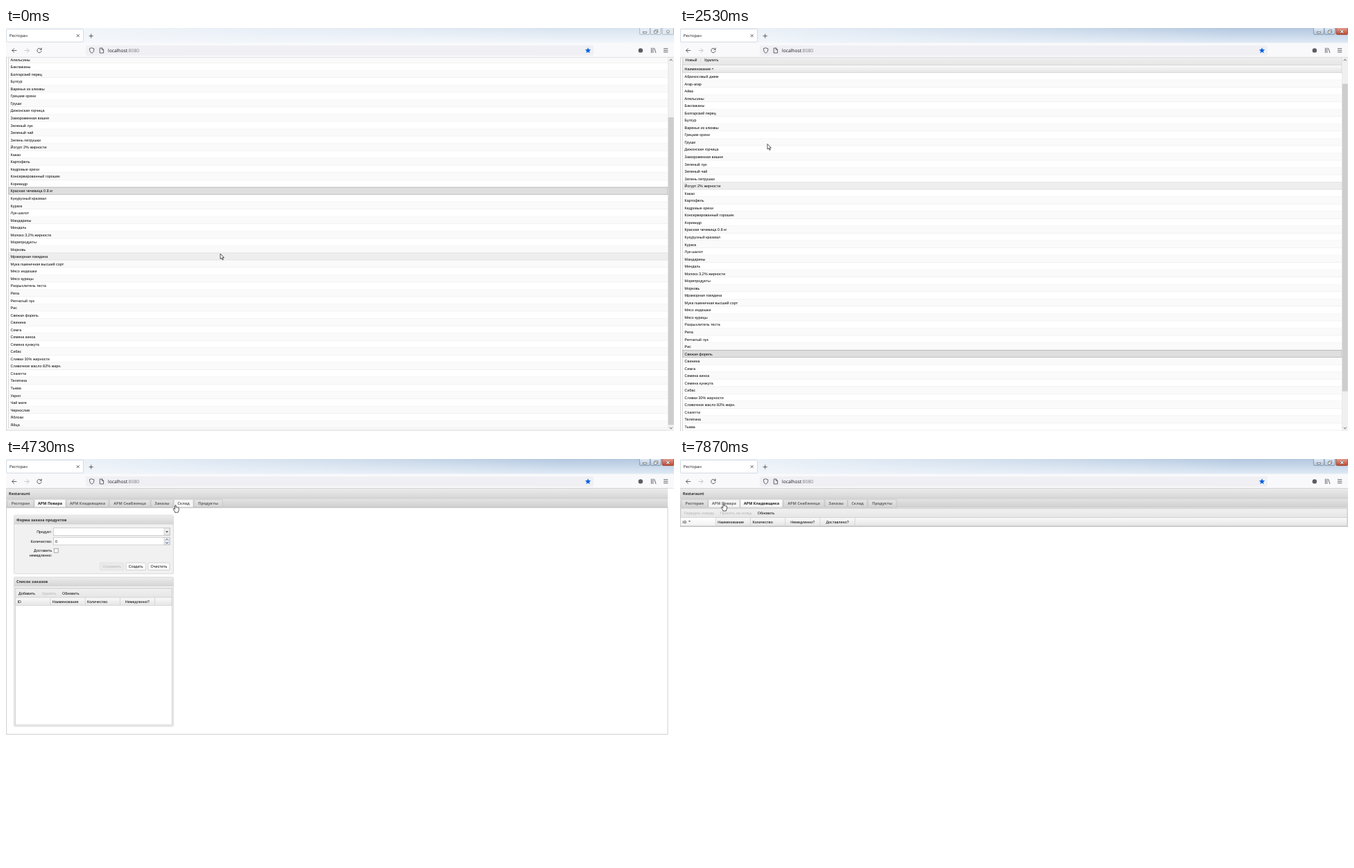
Recreate the animation shown at these times as an HTML page. Size 963 by 582 pixels, loop 8000 ms.

```html
<!DOCTYPE html>
<html lang="ru">
<head>
<meta charset="utf-8">
<title>Ресторан</title>
<style>
  html, body { margin: 0; width: 100%; height: 100%; overflow: hidden; background: #fff; }
  svg { display: block; width: 963px; height: 582px; }
  text { font: 5.45px "Liberation Sans", Arial, sans-serif; fill: #000; text-rendering: geometricPrecision; white-space: pre; }
  .bold { font: bold 5.5px "Noto Sans", "Open Sans", sans-serif; fill: #333; }
  .ui { font: 5.75px "Open Sans", "Noto Sans", sans-serif; fill: #15141a; }
  .url { font-size: 6.7px; }
  .off { fill: #b4b4b4; }
  .icon { fill: none; stroke: #4a4a52; stroke-width: .85; stroke-linecap: round; stroke-linejoin: round; }
  .tab rect { fill: url(#tabOff); stroke: #bdbdbd; stroke-width: .6; }
  .tab text { fill: #666; }
  .tab.hover rect { fill: #f6f6f6; }
  .tab.active rect { fill: url(#tabOn); }
  .tab.active text { fill: #222; }
</style>
</head>
<body>
<svg id="stage" viewBox="0 0 963 582" xmlns="http://www.w3.org/2000/svg"></svg>
<script>
const stage = document.getElementById('stage');
const LOOP = 8000, FPS = 15;
const ROW = 10.54, ROW0 = 99, MAX = 90.3;

// ---------- drawing helpers ----------
function add(parent, tag, attrs = {}, body) {
  const node = document.createElementNS('http://www.w3.org/2000/svg', tag);
  for (const key in attrs) node.setAttribute(key, attrs[key]);
  if (body !== undefined) node.textContent = body;
  parent.appendChild(node);
  return node;
}
const group = (parent, attrs) => add(parent, 'g', attrs);
const box = (p, x, y, width, height, fill, stroke, more) =>
  add(p, 'rect', { x, y, width, height, fill, ...(stroke && { stroke, 'stroke-width': .6 }), ...more });
const label = (p, str, x, mid, cls = '', anchor = 'start') =>
  add(p, 'text', { x, y: mid + 2, class: cls, 'text-anchor': anchor }, str);
const path = (p, d, attrs = { class: 'icon' }) => add(p, 'path', { d, ...attrs });
const vline = (p, x, y, h, color = '#cdcdcd') => box(p, x - .3, y, .6, h, color);
const hline = (p, x, y, w, color = '#cdcdcd') => box(p, x, y - .3, w, .6, color);
const show = (node, on) => node.setAttribute('display', on ? 'inline' : 'none');

const defs = add(stage, 'defs');
function gradient(id, stops, horizontal) {
  const g = add(defs, 'linearGradient', { id, x2: horizontal ? 1 : 0, y2: horizontal ? 0 : 1 });
  stops.forEach(([color, alpha = 1], i) =>
    add(g, 'stop', { offset: i / (stops.length - 1), 'stop-color': color, 'stop-opacity': alpha }));
}
gradient('tabOff', [['#e6e6e6'], ['#d3d3d3']]);
gradient('tabOn', [['#ffffff'], ['#f3f3f3']]);
gradient('head', [['#ececec'], ['#d5d5d5']]);
gradient('strip', [['#e4e4e4'], ['#cfcfcf']]);
gradient('bar', [['#f0f0f0'], ['#e6e6e6']]);
gradient('cols', [['#fafafa'], ['#e5e5e5']]);
gradient('sorted', [['#ffffff'], ['#f2f2f2']]);
gradient('aero', [['#b3c8e0'], ['#e0eaf5']]);
gradient('aeroIdle', [['#d8e3ef'], ['#f2f6fa']]);
gradient('shine', [['#f6f9fc', .95], ['#f2f6fb', .55], ['#ffffff', 0]], true);
gradient('glass', [['#e3ecf6'], ['#b5c8dd']]);
gradient('red', [['#e6a79b'], ['#c5452c']]);
add(add(defs, 'clipPath', { id: 'viewport' }), 'rect', { y: 42, width: 963, height: 540 });

// ---------- page ----------
const view = group(stage, { 'clip-path': 'url(#viewport)' });
box(view, 0, 42, 963, 540, '#fff');
const page = group(view);

const head = box(page, 0, 42.5, 954, 14.5, 'url(#head)');
const strip = box(page, 0, 57, 954, 12.8, 'url(#strip)');
const edges = [hline(page, 0, 42.7, 954, '#b8b8b8'), hline(page, 0, 57, 954, '#c4c4c4'), hline(page, 0, 70, 954, '#bcbcbc')];
label(page, 'Restaraunt', 4, 49.6, 'bold');

const TABS = [
  ['Ресторан', 2, 40], ['АРМ Повара', 41, 86], ['АРМ Кладовщика', 87, 148],
  ['АРМ Снабженца', 149, 208], ['Заказы', 209, 241], ['Склад', 242, 270], ['Продукты', 271, 312]
];
const tabs = TABS.map(([name, x, end]) => {
  const g = group(page, { class: 'tab' });
  box(g, x, 58.3, end - x, 11.7, '', '', { rx: 1 });
  label(g, name, (x + end) / 2, 64.1, 'bold', 'middle');
  return g;
});

function toolbar(p, x, y, w, items, h = 13) {
  box(p, x, y, w, h, 'url(#bar)', '#cfcfcf');
  for (const [name, tx, off] of items) label(p, name, tx, y + h / 2, off ? 'off' : '');
}

function columns(p, x, y, w, h, names, first, sorted) {
  box(p, x, y, w, h, 'url(#cols)', '#c9c9c9');
  if (sorted) box(p, x, y + .3, first - x, h - .6, 'url(#sorted)');
  names.forEach((name, i) => {
    const end = first + i * 50.15, mid = y + h / 2;
    vline(p, end, y, h, '#c5c5c5');
    if (i < 3) label(p, name, i ? end - 47.3 : x + 2.8, mid);
    else label(p, name, end - 25.1, mid, '', 'middle');
  });
}

// product list
const list = group(page);
const PRODUCTS = `Абрикосовый джем,Агар-агар,Айва,Апельсины,Баклажаны,Болгарский перец,Булгур,Варенье из клюквы,Грецкие орехи,Груши,Дижонская горчица,Замороженная вишня,Зеленый лук,Зеленый чай,Зелень петрушки,Йогурт 2% жирности,Какао,Картофель,Кедровые орехи,Консервированный горошек,Кориандр,Красная чечевица 0.8 кг,Кукурузный крахмал,Курага,Лук-шалот,Мандарины,Миндаль,Молоко 3;2% жирности,Морепродукты,Морковь,Мраморная говядина,Мука пшеничная высший сорт,Мясо индюшки,Мясо курицы,Разрыхлитель теста,Репа,Репчатый лук,Рис,Свежая форель,Свинина,Семга,Семена киноа,Семена кунжута,Сибас,Сливки 30% жирности,Сливочное масло 82% жирн.,Спагетти,Телятина,Тыква,Укроп,Чай мате,Чернослив,Яблоки,Яйца`
  .split(',').map(s => s.replace(';', ','));
const rowY = i => ROW0 + i * ROW;
const listEnd = rowY(PRODUCTS.length);
vline(list, .5, 70, listEnd - 67, '#b5b5b5');
box(list, 3.7, 73.6, 951, listEnd - 73.6, '#fff', '#c2c2c2');
toolbar(list, 4, 74, 950, [['Новый', 7.8], ['Удалить', 34.8]], 13.6);
vline(list, 30, 78, 5.6);
columns(list, 4, 87.6, 950, 11, [], 0);
label(list, 'Наименование', 6.6, 93);
path(list, 'M45.3 93.8l1.7-1.8 1.7 1.8z', { fill: '#555' });
PRODUCTS.forEach((_, i) => {
  if (i % 2) box(list, 4, rowY(i), 950, ROW, '#fafafa');
  hline(list, 4, rowY(i + 1) - .2, 950, '#ebebeb');
});
const hoverRow = box(list, 4, 0, 950, ROW - .4, '#eeeeee', '#dcdcdc');
const selRow = box(list, 4, 0, 950, ROW - .4, '#dfdfdf', '#a0a0a0');
PRODUCTS.forEach((name, i) => label(list, name, 6.6, rowY(i) + 5.4));
hline(list, 0, listEnd + 3, 954, '#b5b5b5');

// order form
const form = group(page);
box(form, .4, 70, 953.6, 327.5, 'none', '#b0b0b0');
function panel(y, h, title) {
  box(form, 11.6, y, 229.8, h, '#f1f1f1', '#c6c6c6', { rx: 1.5 });
  box(form, 11.9, y + .3, 229.2, 12.6, 'url(#head)');
  hline(form, 11.6, y + 13, 229.8, '#cbcbcb');
  label(form, title, 15, y + 6.8, 'bold');
}
panel(81, 84.8, 'Форма заказа продуктов');
[['Продукт:', 105], ['Количество:', 118.7], ['Доставить', 132.4], ['немедленно:', 139.4]]
  .forEach(([s, y]) => label(form, s, 66.3, y, '', 'end'));
for (const y of [99.5, 113.2]) {
  box(form, 68.6, y, 167.6, 10.8, '#fff', '#b5b5b5');
  box(form, 228, y + .3, 8, 10.2, 'url(#bar)', '#bdbdbd');
}
path(form, 'M230.2 104.2h3.6l-1.8 2z', { fill: '#333' });
path(form, 'M230 117.3l2-2 2 2M230 120l2 2 2-2', { fill: 'none', stroke: '#2c4f9c', 'stroke-width': .9 });
label(form, '0', 71, 118.7);
box(form, 69.2, 129.2, 6, 6, '#f7f7f7', '#777');
[['Сохранить', 135.5, 34.4, 1], ['Создать', 173, 28.4], ['Очистить', 204.8, 31.2]].forEach(([s, x, w, off]) => {
  box(form, x, 149.8, w, 10.6, off ? '#ebebeb' : '#fbfbfb', off ? '#d8d8d8' : '#bbb', { rx: 1.2 });
  label(form, s, x + w / 2, 155.2, off ? 'off' : '', 'middle');
});
panel(170.5, 215.7, 'Список заказов');
box(form, 13.6, 186.5, 225.6, 197.5, '#fff', '#b9b9b9');
toolbar(form, 13.8, 187, 225.2, [['Добавить', 18], ['Удалить', 51.8, 1], ['Обновить', 81]]);
columns(form, 13.8, 200, 225.2, 11.4, ['ID', 'Наименование', 'Количество', 'Немедленно?'], 64, false);

// plain grids
const BASE = ['ID', 'Наименование', 'Количество'];
function grid(items, extra) {
  const g = group(page);
  box(g, .6, 71, 961.8, 26.6, '#e9e9e9', '#b8b8b8');
  toolbar(g, 1.2, 71.8, 960.6, items, 12.8);
  columns(g, 1.2, 84.6, 960.6, 11.8, [...BASE, ...extra], 51.5, true);
  path(g, 'M12 89.2h3.4l-1.7 1.8z', { fill: '#555' });
  hline(g, 0, 97.6, 963, '#b5b5b5');
  return g;
}
const keeper = grid([['Передать повару', 5.8, 1], ['Принять на склад', 58, 1], ['Обновить', 111.8]], ['Немедленно?', 'Доставлено?']);
const supplier = grid([['Взять в работу', 5.8, 1], ['Доставлено', 53, 1], ['Обновить', 91]], ['Немедленно?', 'В работе?']);
const orders = grid([['Обновить', 5.8]], ['Немедленно?', 'В работе', 'Доставлено', 'Активен']);
const store = grid([['Обновить', 5.8]], []);
const views = { 1: form, 2: keeper, 3: supplier, 4: orders, 5: store, 6: list };

// scrollbar
const bar = group(view);
box(bar, 954.3, 42, 8.7, 540, '#f0f0f0');
const thumb = box(bar, 954.6, 51, 8.1, 444, '#cdcdcd');
path(bar, 'M956.8 47.2l1.9-1.9 1.9 1.9M956.8 576.8l1.9 1.9 1.9-1.9', { fill: 'none', stroke: '#505050', 'stroke-width': 1 });

// ---------- browser frame ----------
const idle = box(stage, 0, 0, 963, 22, 'url(#aeroIdle)');
const awake = box(stage, 0, 0, 963, 22, 'url(#aero)');
box(stage, 0, 0, 800, 22, 'url(#shine)');
box(stage, 0, 21.5, 963, 20.7, '#f9f9fb');
hline(stage, 0, 42.2, 963, '#cfcfd4');
box(stage, .6, 1.6, 111, 18.6, '#fff', '#b9c3d0', { rx: 1.8 });
label(stage, 'Ресторан', 5, 11.4, 'ui');
path(stage, 'M102 9.4l3.4 3.4M105.4 9.4l-3.4 3.4M122.7 8.8v5.4M120 11.5h5.4');
box(stage, 115, 25.2, 732, 14.6, '#f0f0f4', '', { rx: 2 });
path(stage, 'M15 32.5H8.8m2.8-2.8l-2.8 2.8 2.8 2.8');
path(stage, 'M27 32.5h6.2m-2.8-2.8l2.8 2.8-2.8 2.8', { class: 'icon', style: 'stroke:#bcbcc2' });
path(stage, 'M50.8 30.8a3.2 3.2 0 1 0 .4 2.4M51.2 28.9v2.3h-2.3');
path(stage, 'M123.7 28.8l3.2 1.1c0 3-.5 5.1-3.2 6.4-2.7-1.3-3.2-3.4-3.2-6.4z');
path(stage, 'M135.6 29h2.8l2.2 2.2v4.8h-5zM138.3 29v2.3h2.3');
const url = label(stage, 'localhost', 147, 32.8, 'ui url');
add(url, 'tspan', { fill: '#77777d' }, ':8080');
const star = Array.from({ length: 10 }, (_, i) => {
  const r = i % 2 ? 2 : 4.4, a = (i / 5 - .5) * Math.PI;
  return `${839 + r * Math.cos(a)},${32.6 + r * Math.sin(a)}`;
}).join(' ');
add(stage, 'polygon', { points: star, fill: '#0c62e0' });
add(stage, 'circle', { cx: 914.8, cy: 32.4, r: 3.2, fill: '#5b5b63' });
path(stage, 'M930.4 29v6.6M932.7 29v6.6M934.6 29.2l2.2 6.4M948.3 29.8h5.6M948.3 32.3h5.6M948.3 34.8h5.6');

[[913.4, 15], [929, 15.2], [946, 16.4]].forEach(([x, w], i) => {
  box(idle.parentNode, x, -1, w, 10.4, '#e2eaf3', '#8c9aab', { rx: 1.5 });
});
const live = group(stage);
[[913.4, 15], [929, 15.2], [946, 16.4]].forEach(([x, w], i) =>
  box(live, x, -1, w, 10.4, i < 2 ? 'url(#glass)' : 'url(#red)', i < 2 ? '#74879d' : '#7f3a30', { rx: 1.5 }));
box(stage, 918.4, 5.6, 5, 1.8, '#fff', '#555');
box(stage, 935.8, 2.8, 4, 3.2, '#fff', '#555');
box(stage, 934.2, 4.2, 4, 3.2, '#fff', '#555');
path(stage, 'M952.4 3.2l3.8 4M956.2 3.2l-3.8 4', { stroke: '#555', 'stroke-width': 2.1 });
path(stage, 'M952.4 3.2l3.8 4M956.2 3.2l-3.8 4', { stroke: '#fff', 'stroke-width': 1.2 });

// ---------- pointers ----------
const ink = { fill: '#fff', stroke: '#111', 'stroke-width': .7, 'stroke-linejoin': 'round' };
const arrow = path(stage, 'M0 0v7.6l1.8-1.6 1.3 2.9 1.2-.5-1.3-2.8h2.4z', ink);
const hand = path(stage, 'M-.8 6V.9Q0-.2.8.9V3.6q.9-.7 1.5.1.9-.5 1.4.3 1.2-.2 1.2 1V7.400Q4.600 9 3.800 9.800V11H-.8V10Q-1.700 9-2.600 7.200-3.600 5.700-2.800 5.300-2 5-.8 6.500z', ink);

// ---------- timeline, in steps of 1/15 s ----------
const POINTER = [
  [0, 309, 326], [1, 304, 328], [3, 240, 350], [5, 130, 388], [7, 55, 411], [9, 33, 416.5],
  [18, 33, 416.5], [21, 60.5, 416], [24, 60.5, 416], [25, 64, 400], [26, 84, 290], [27, 106, 163],
  [28, 113, 146], [29, 116, 140], [30, 118, 143], [33, 126, 167.5], [43, 126, 167.5],
  [44, 127, 160], [45, 133, 132], [46, 143, 95], [47, 149, 81], [48, 147, 77], [51, 100, 70],
  [53, 72, 67], [55, 63, 65.5], [65, 63, 65.5], [66, 67, 65.5], [68, 122, 66], [70, 215, 66],
  [71, 244.3, 66.2], [73, 254, 66], [81, 254, 66], [84, 238, 66], [87, 229, 65.6], [95, 229, 65.6],
  [98, 184, 68], [102, 184, 68], [106, 150, 67], [110, 118, 66], [112, 118, 66], [114, 110, 65],
  [116, 80, 64], [118, 62.8, 64]
];
const SCROLL = [[36, MAX], [37, 72], [38, 34.3], [39, 10], [40, 0]];
const TAB = [[0, 6], [60, 1], [74, 5], [90, 4], [101, 3], [112, 2]];
const VIEW = [[0, 6], [63, 1], [76, 5], [92, 4], [103, 3], [114, 2]];

const held = (track, k) => track.filter(p => p[0] <= k).pop()[1];
function tween(track, k) {
  const i = track.findIndex(p => p[0] > k);
  if (i < 0) return track[track.length - 1].slice(1);
  if (i === 0) return track[0].slice(1);
  const a = track[i - 1], b = track[i], f = (k - a[0]) / (b[0] - a[0]);
  return a.slice(1).map((v, j) => v + (b[j + 1] - v) * f);
}

function draw(k) {
  const [x, y] = tween(POINTER, k), [scroll] = tween(SCROLL, k);
  const current = held(VIEW, k), active = held(TAB, k), isList = current === 6;

  show(idle, k < 12);
  show(awake, k >= 12);
  show(live, k >= 12);

  page.setAttribute('transform', `translate(0 ${-scroll})`);
  thumb.setAttribute('y', 51 + scroll * .864);
  show(bar, isList);
  for (const id in views) show(views[id], +id === current);
  const width = current === 6 || current === 1 ? 954 : 963;
  [head, strip, ...edges].forEach(n => n.setAttribute('width', width));

  const over = scroll === 0 && y > 58 && y < 70.5 ? TABS.findIndex(t => x >= t[1] && x <= t[2] + 1) : -1;
  tabs.forEach((t, i) => t.setAttribute('class', 'tab' + (i === active ? ' active' : i === over ? ' hover' : '')));

  // row highlight trails the pointer by one step
  const sel = k < 12 ? 21 : 38;
  const row = Math.floor((tween(POINTER, k - 1)[1] + (k < 40 ? MAX : 0) - ROW0) / ROW);
  selRow.setAttribute('y', rowY(sel));
  selRow.setAttribute('stroke', k < 60 ? '#a0a0a0' : '#dfdfdf');
  show(hoverRow, row >= 0 && row !== sel);
  hoverRow.setAttribute('y', rowY(row));

  arrow.setAttribute('transform', `translate(${x} ${y})`);
  hand.setAttribute('transform', `translate(${x} ${y})`);
  show(arrow, over < 0);
  show(hand, over >= 0);
}

const start = performance.now();
let last = -1;
function tick() {
  const t = (performance.now() - start) % LOOP;
  const k = Math.floor((t + 4) * FPS / 1000) % (LOOP * FPS / 1000);
  if (k !== last) draw(last = k);
  requestAnimationFrame(tick);
}
tick();
</script>
</body>
</html>
```
